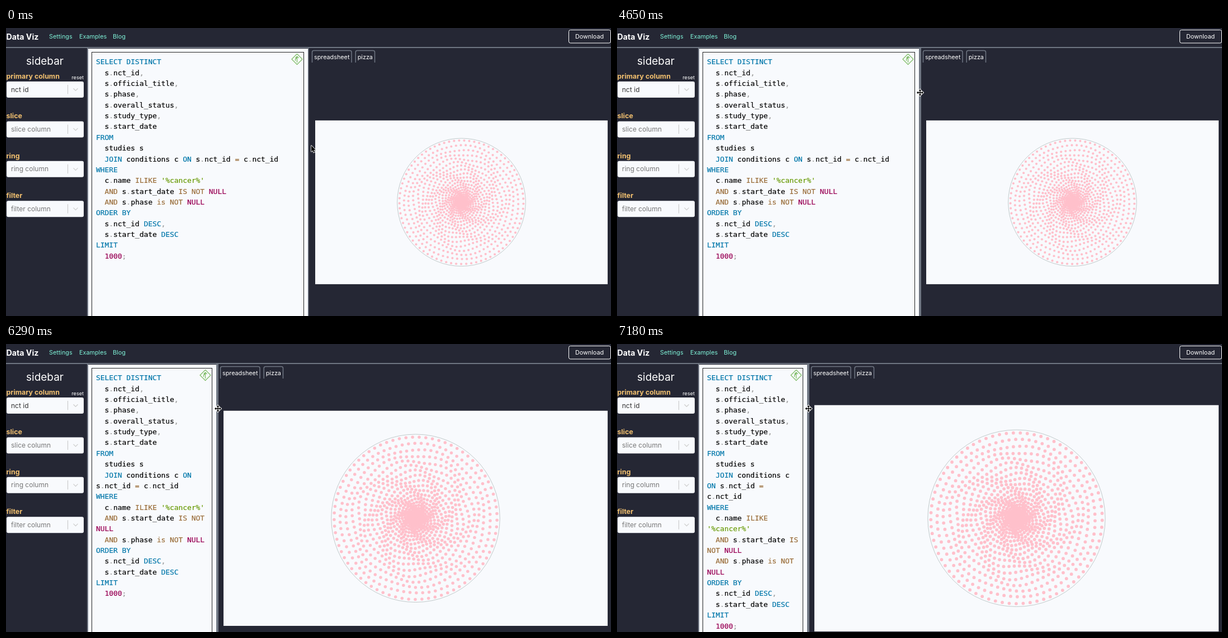
Write an HTML page that moves like this. It is 1082 px wide and 517 px high and loops after 8000 ms.

```html
<!DOCTYPE html>
<html lang="en">
<head>
<meta charset="utf-8">
<title>Data Viz</title>
<style>
  html, body { margin: 0; width: 100%; height: 100%; overflow: hidden; background: #252734; }
  #stage { position: absolute; left: 0; top: 0; font: 10.8px Inter, sans-serif; }
  #stage text { fill: #fff; dominant-baseline: central; }
  #stage .link { fill: #7ff3d8; }
  #stage .label { fill: #f2c06f; font-size: 12.4px; font-weight: 700; }
  #stage .value { fill: #333; font-size: 12px; }
  #stage .hint { fill: #777; font-size: 12px; }
  .rule { fill: #6f7682; }
  .paper { fill: #f8fafd; }
  .line { fill: none; stroke: #6f7682; stroke-width: 1.5; }
  #code {
    box-sizing: border-box; height: 520px; margin: 0; padding: 7.3px 7px;
    border: 1px solid #222; color: #000; white-space: pre-wrap;
    font: 12.9px/19.36px "DejaVu Sans Mono", monospace;
    -webkit-text-stroke: 0.2px;
  }
  .string { color: #690; }
  .keyword { color: #07a; }
  .operator { color: #9a6e3a; }
  .number { color: #905; }
  .mark { color: #999; }
</style>
</head>
<body>
<svg id="stage" width="1082" height="517">
  <text x="0.5" y="15" font-size="14.2" font-weight="700">Data Viz</text>
  <text x="77" y="15" class="link">Settings</text>
  <text x="131" y="15" class="link">Examples</text>
  <text x="191" y="15" class="link">Blog</text>
  <rect x="1006.5" y="3.5" width="75" height="23.5" rx="3" fill="none" stroke="#fff"/>
  <text x="1043.5" y="15" text-anchor="middle">Download</text>
  <rect y="34" width="1082" height="2" class="rule"/>

  <text x="69.5" y="59" font-size="19" text-anchor="middle">sidebar</text>
  <text x="139" y="88" font-size="9.1" text-anchor="end">reset</text>
  <g id="fields"></g>

  <rect x="145" y="35" width="2" height="482" class="rule"/>
  <rect id="editor" x="147" y="37" height="480" class="paper"/>
  <foreignObject id="codeBox" x="153" y="43" height="520"><pre id="code"></pre></foreignObject>
  <rect id="splitter" y="35" height="482" class="rule"/>

  <g id="movers">
    <g fill="none" stroke="#80bd68" stroke-width="1.3" stroke-linejoin="round">
      <path d="M520.5 46.5L530 56L520.5 65.5L511 56Z"/>
      <path d="M520.5 62V51M517.5 54L520.5 51L523.5 54M517.5 59V56L520.5 53"/>
    </g>
    <path class="line" d="M547.5 62V43.5Q547.5 40.5 550.5 40.5H615Q618 40.5 618 43.5V62"/>
    <text x="582.7" y="52" text-anchor="middle">spreadsheet</text>
    <path class="line" d="M625.2 62V43.5Q625.2 40.5 628.2 40.5H656.5Q659.5 40.5 659.5 43.5V62"/>
    <text x="642.3" y="52" text-anchor="middle">pizza</text>
  </g>

  <svg id="chart" viewBox="0 0 1000 562.5">
    <rect width="1000" height="562.5" class="paper"/>
    <circle cx="500" cy="281.25" r="219.5" fill="none" stroke="#a9b5b5" stroke-width="0.7" vector-effect="non-scaling-stroke"/>
    <g id="dots" fill="#ffc0cb"></g>
  </svg>

  <g id="cursor" stroke="#fff" stroke-linejoin="round" paint-order="stroke">
    <path id="arrow" stroke-width="1.6" d="M0 0V11L2.5 8.7L4.2 12.6L6 11.8L4.3 8H7.8Z"/>
    <path id="cross" stroke-width="2" d="M0 -6L2.4 -3.2H.7V-.7H3.2V-2.4L6 0L3.2 2.4V.7H.7V3.2H2.4L0 6L-2.4 3.2H-.7V.7H-3.2V2.4L-6 0L-3.2 -2.4V-.7H-.7V-3.2H-2.4Z"/>
  </g>
</svg>

<script>
const $ = id => document.getElementById(id);
const set = (id, attrs) => {
  for (const key in attrs) $(id).setAttribute(key, attrs[key]);
};

const query = `SELECT DISTINCT
  s.nct_id,
  s.official_title,
  s.phase,
  s.overall_status,
  s.study_type,
  s.start_date
FROM
  studies s
  JOIN conditions c ON s.nct_id = c.nct_id
WHERE
  c.name ILIKE '%cancer%'
  AND s.start_date IS NOT NULL
  AND s.phase is NOT NULL
ORDER BY
  s.nct_id DESC,
  s.start_date DESC
LIMIT
  1000;`;
const kinds = ['string', 'keyword', 'operator', 'number', 'mark'];
const tokens = /('[^']*')|\b(SELECT|DISTINCT|FROM|JOIN|ON|WHERE|ORDER|BY|DESC|LIMIT)\b|(\b(?:AND|ILIKE|IS|is|NOT)\b|=)|\b(NULL|1000)\b|([.,;])/g;
$('code').innerHTML = query.replace(tokens, (text, ...groups) =>
  `<span class="${kinds[groups.findIndex(g => g)]}">${text}</span>`);

$('fields').innerHTML = ['primary column', 'slice', 'ring', 'filter'].map((name, i) => `
  <g transform="translate(0 ${i * 71.4})">
    <text x="0.5" y="86.5" class="label">${name}</text>
    <rect x="1" y="96" width="138" height="29" rx="3" class="paper"/>
    <text x="9" y="110" class="${i ? 'hint' : 'value'}">${i ? name + ' column' : 'nct id'}</text>
    <path d="M110.5 102V118.5M120.5 108.5L124.5 112.5L128.5 108.5" fill="none" stroke="#ccc" stroke-width="1.2"/>
  </g>`).join('');

// Rings widen outwards, so the dots crowd together at the centre;
// inner rings are turned and rippled to look loosely packed.
const rings = 25;
let dots = '';
for (let k = 1; k <= rings; k++) {
  const count = Math.round(3.08 * k);
  const base = 212 * (k / rings) ** 2;
  const ripple = Math.min(1, (rings - k) / 4) * base / k * 0.6;
  for (let i = 0; i < count; i++) {
    const angle = 2 * Math.PI * i / count + 2.4 * k;
    const radius = base + ripple * Math.sin(7 * angle + k);
    const x = 500 + radius * Math.cos(angle), y = 281.25 + radius * Math.sin(angle);
    dots += `<circle cx="${x.toFixed(2)}" cy="${y.toFixed(2)}" r="4"/>`;
  }
}
$('dots').innerHTML = dots;

// time, cursor x, cursor y, splitter shift
const path = [
  [0, 546, 211, 0], [300, 546, 211, 0], [1200, 536, 166, 0], [1350, 536, 166, 0],
  [1500, 537, 167, 0], [1950, 532, 130, 0], [2100, 532, 130, 0], [2400, 532, 126, 0],
  [2850, 532, 126, 0], [3450, 543, 108, 0], [3900, 540, 112, 0], [4650, 542, 116, 0],
  [5100, 542, 116, 0], [5250, 533, 116, -8], [5850, 408, 114, -127.5],
  [6150, 384, 115, -155], [6300, 379, 116, -164], [6600, 367.5, 116, -176],
  [7200, 342.5, 116, -200], [8000, 342.5, 116, -200]
];
function pose(time) {
  const n = path.findIndex(p => p[0] > time);
  const a = path[n - 1], b = path[n];
  const u = (time - a[0]) / (b[0] - a[0]);
  return a.map((v, i) => v + (b[i] - v) * u);
}

function draw(now) {
  const time = now % 8000;
  // The screen refreshes every 150 ms, slightly early near the end.
  const step = Math.floor((time + (time > 6200 ? 20 : 0)) / 150) * 150;
  const [, x, y, shift] = pose(step);
  const hover = step >= 3300 && step < 3750 || step >= 4200;
  const cross = step >= 4200 && step < 5250 || step >= 6300;
  const width = 523 - shift, height = width * 0.5625;

  set('editor', { width: 393 + shift });
  set('codeBox', { width: 380 + shift });
  set('splitter', { x: 540 + shift, width: hover ? 4 : 1.5 });
  set('movers', { transform: `translate(${shift} 0)` });
  set('chart', { x: 553 + shift, y: 312.8 - height / 2, width, height });
  set('cursor', { transform: `translate(${x} ${y})` });
  set('arrow', { visibility: cross ? 'hidden' : 'visible' });
  set('cross', { visibility: cross ? 'visible' : 'hidden' });
  requestAnimationFrame(() => draw(performance.now()));
}
draw(performance.now());
</script>
</body>
</html>
```
